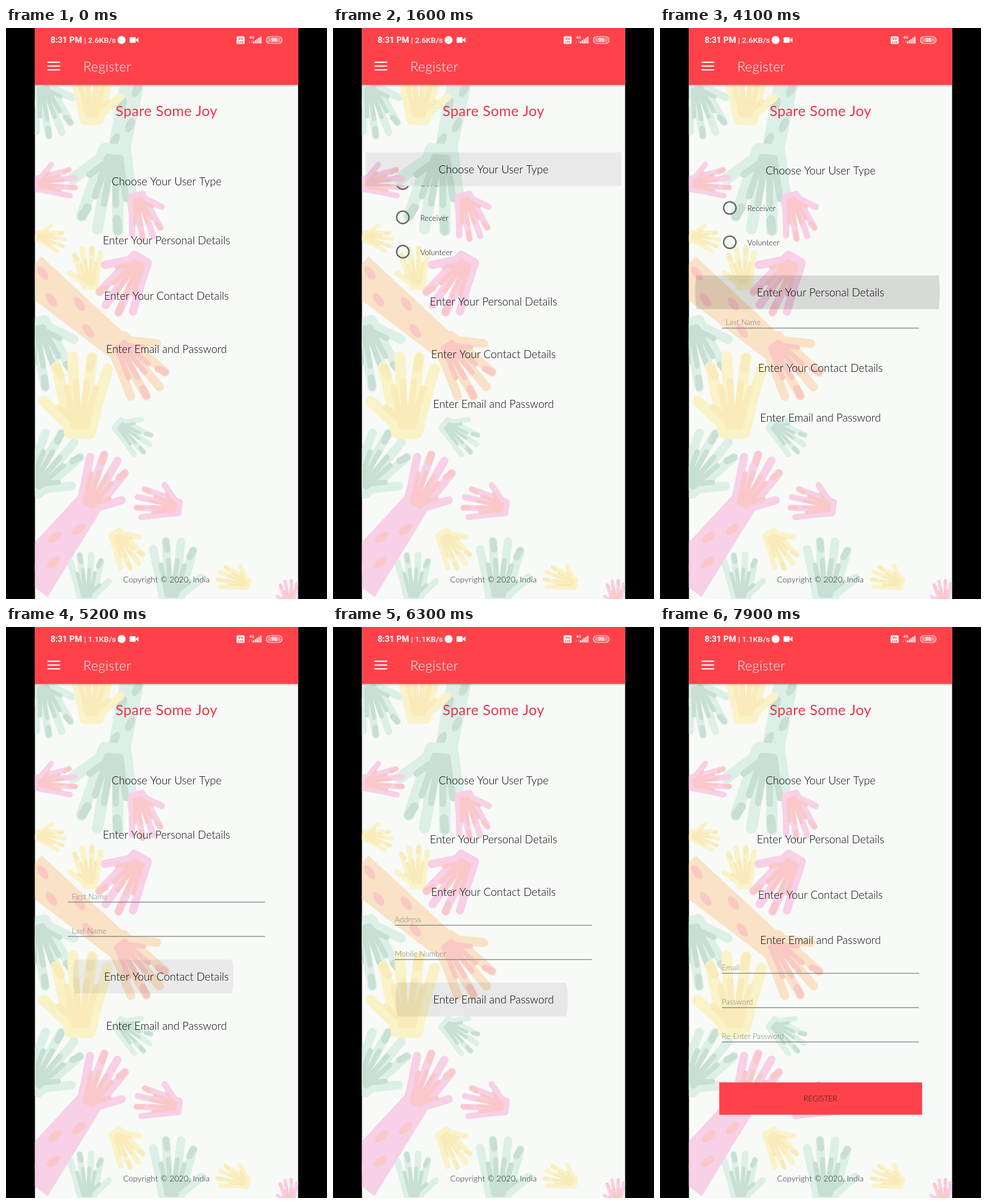
Recreate the animation shown at these times as an HTML page with a canvas. Size 561 by 998 pixels, loop 8 s.

```html
<!DOCTYPE html>
<html lang="en">
<head>
<meta charset="utf-8">
<title>Register form</title>
<style>
  html, body { margin: 0; width: 100%; height: 100%; overflow: hidden; background: #000; }
  canvas { display: block; width: 100%; height: 100%; }
</style>
</head>
<body>
<canvas id="stage" width="561" height="998"></canvas>
<script>
const W = 561, H = 998, LOOP = 8000, STEP = 100;
const LEFT = 50.6, RIGHT = 510.5, MID = 280.5, BAR = 99.5;
const RED = '#ff424a';
const ctx = document.getElementById('stage').getContext('2d');

const clamp = v => Math.max(0, Math.min(1, v));
const smooth = v => { v = clamp(v); return v * v * (3 - 2 * v); };

// ---------- backdrop of hands ----------
const art = document.createElement('canvas');
art.width = W;
art.height = H;
const g = art.getContext('2d');
g.lineCap = g.lineJoin = 'round';

const MINT = ['#dcf0e8', '#c8dfd3'], YELLOW = ['#faf3c8', '#f9ebba'],
      PINK = ['#f8d0e7', '#fac8c8'], ORANGE = ['#fae2c6', '#fac9c4'];

function line(color, width, x1, y1, x2, y2) {
  g.strokeStyle = color;
  g.lineWidth = width;
  g.beginPath();
  g.moveTo(x1, y1);
  g.lineTo(x2, y2);
  g.stroke();
}

// Size runs from the palm centre to the longest fingertip; side says where the thumb is.
function hand([color, accent], x, y, size, deg, side) {
  g.save();
  g.translate(x, y);
  g.rotate((deg + 90) * Math.PI / 180);
  g.scale(size * side, size);

  g.fillStyle = g.strokeStyle = color;
  g.lineWidth = .2;
  g.beginPath();
  for (const [px, py] of [[-.23, -.1], [.23, -.1], [.15, .27], [-.15, .27]]) g.lineTo(px, py);
  g.closePath();
  g.fill();
  g.stroke();
  line(color, .17, .18, .15, .58, -.2);

  for (let i = 0; i < 4; i++) {
    const u = i - 1.5, a = u * .33, r = .93 - .04 * u * u;
    const tx = Math.sin(a) * r, ty = -Math.cos(a) * r;
    line(color, .17, u * .16, -.1, tx, ty);
    if (accent && i % 2) line(accent, .13, tx * .82, ty * .82, tx, ty);
  }
  if (accent) hand([accent], 0, 0, .58, -90, 1);
  g.restore();
}

function arm([color, accent], x1, y1, w1, x2, y2, w2) {
  const len = Math.hypot(x2 - x1, y2 - y1);
  g.save();
  g.translate(x1, y1);
  g.rotate(Math.atan2(y2 - y1, x2 - x1));
  g.fillStyle = color;
  g.beginPath();
  for (const [x, w] of [[0, -w1], [len, -w2], [len, w2], [0, w1]]) g.lineTo(x, w / 2);
  g.fill();
  g.fillStyle = accent;
  for (let i = 0; i < 4; i++) {
    g.beginPath();
    g.ellipse(len * (.1 + i * .2), (i % 2 ? 1 : -1) * w2 * .27, 14, 7, .25, 0, 7);
    g.fill();
  }
  g.restore();
}

function paintArt() {
  g.fillStyle = '#f8faf8';
  g.fillRect(LEFT, 0, RIGHT - LEFT, H);
  g.beginPath();
  g.rect(LEFT, BAR, RIGHT - LEFT, H - BAR);
  g.clip();

  arm(MINT, 222, 90, 42, 191, 245, 38);
  hand(MINT, 187, 246, 118, 95, 1);
  hand(MINT, 68, 118, 77, 75, -1);
  hand(MINT, 60, 540, 96, 75, -1);
  hand(MINT, 207, 702, 56, 40, -1);
  hand(MINT, 60, 785, 92, -55, 1);
  hand(MINT, 141, 982, 67, -92, 1);
  hand(MINT, 290, 977, 88, -88, 1);

  hand(YELLOW, 150, 138, 85, -90, 1);
  hand(YELLOW, 65, 366, 41, 15, -1);
  hand(YELLOW, 146, 437, 57, -95, -1);
  hand(YELLOW, 130, 677, 112, -88, -1);
  hand(YELLOW, 199, 896, 56, 60, -1);
  hand(YELLOW, 411, 968, 45, 195, 1);

  arm(PINK, 40, 970, 82, 150, 825, 46);
  hand(PINK, 151, 820, 84, -65, 1);
  hand(PINK, 69, 272, 57, -2, -1);
  hand(PINK, 233, 310, 64, 75, -1);
  hand(PINK, 224, 424, 85, 120, 1);
  hand(PINK, 285, 836, 62, 187, 1);
  hand(PINK, 496, 999, 36, -95, -1);

  arm(ORANGE, 40, 425, 68, 200, 560, 48);
  hand(ORANGE, 209, 567, 92, 55, -1);
}

// ---------- drawing helpers ----------
function text(str, x, y, size, color, { align = 'left', weight = 300, family = 'Lato', gap = 0 } = {}) {
  ctx.font = `${weight} ${size}px ${family}, sans-serif`;
  ctx.letterSpacing = gap + 'px';
  ctx.textAlign = align;
  ctx.fillStyle = color;
  ctx.fillText(str, x, y + size * .355);
}

function rect(color, x, y, w, h) {
  ctx.fillStyle = color;
  ctx.fillRect(x, y, w, h);
}

function pill(x, y, w, h, r, fill) {
  ctx.beginPath();
  ctx.roundRect(x, y, w, h, r);
  fill ? ctx.fill() : ctx.stroke();
}

function statusBar(speed) {
  const bold = { family: 'Roboto', weight: 700 };
  const medium = { family: 'Roboto', weight: 500 };
  text('8:31 PM', 78, 21.3, 14.6, '#fff', bold);
  text('| ' + speed, 136.5, 21.5, 13.6, '#fff', medium);
  ctx.fillStyle = ctx.strokeStyle = '#fff';
  ctx.beginPath();
  ctx.arc(202, 21, 7, 0, 7);
  ctx.fill();
  pill(216, 16, 10.5, 10, 1.5, true);
  ctx.beginPath();
  ctx.moveTo(226, 21);
  ctx.lineTo(231.5, 16.5);
  ctx.lineTo(231.5, 25.5);
  ctx.fill();

  pill(403, 14.5, 14, 13.5, 2.5, true);
  text('Vo', 410, 18.3, 6.5, RED, { ...bold, align: 'center' });
  text('LTE', 410, 24.5, 6, RED, { ...bold, align: 'center' });
  text('4G', 425, 16.5, 7, '#fff', medium);
  text('↓↑', 423, 24, 5.5, '#ffd0d2', { family: 'DejaVu Sans', weight: 400 });
  for (let i = 0; i < 5; i++) rect('#fff', 431.5 + i * 3.2, 23.5 - i * 2.1, 2.1, 3.5 + i * 2.1);
  ctx.lineWidth = 1.2;
  pill(455, 15, 27.5, 12, 6, false);
  ctx.fillStyle = '#ff8a8f';
  pill(457, 17, 23.5, 8, 4, true);
  text('96', 468.8, 21.1, 9, '#fff', { ...bold, align: 'center' });
}

function appBar(speed) {
  ctx.save();
  ctx.shadowColor = 'rgba(0,0,0,.2)';
  ctx.shadowBlur = 3;
  ctx.shadowOffsetY = 1;
  rect(RED, LEFT, 0, RIGHT - LEFT, BAR);
  ctx.restore();
  statusBar(speed);
  for (let i = 0; i < 3; i++) rect('#fff', 72.6, 58.8 + i * 6.6, 22, 2.2);
  text('Register', 135, 67.5, 23.5, '#fff', { gap: .3 });
}

function option(label, y) {
  ctx.strokeStyle = '#666a68';
  ctx.lineWidth = 2.5;
  ctx.beginPath();
  ctx.arc(122, y, 10.8, 0, 7);
  ctx.stroke();
  text(label, 152.5, y + .8, 13.5, '#111');
}

function field(label, y, x = 108) {
  text(label, x, y, 13.3, '#7d817f');
  rect('#747876', 108, y + 9.2, 344.5, 1.2);
}

// ---------- accordion ----------
const OPEN_MS = 300, CLOSE_MS = 270, ROW = 60, HALF = 29.5;

const stack = (labels, row, first, x) => labels.forEach((label, i) => row(label, first + i * ROW, x));

// y: closed position, lift: own rise when open, push: drop of the next header, at: opening time.
// Contents hang from the bottom edge of their section and slide out below its header.
const SECTIONS = [
  { title: 'Choose Your User Type', y: 268, lift: 27, push: 137, at: 1390,
    body: end => stack(['Donor', 'Receiver', 'Volunteer'], option, end - 207.5) },
  { title: 'Enter Your Personal Details', y: 371, lift: 8, push: 143, at: 3998,
    body: end => stack(['First Name', 'Last Name'], field, end - 140, 115) },
  { title: 'Enter Your Contact Details', y: 468, lift: 5, push: 90, at: 5230,
    body: end => stack(['Address', 'Mobile Number'], field, end - 139.5) },
  { title: 'Enter Email and Password', y: 561, lift: 14, push: 0, at: 6320,
    body: end => {
      stack(['Email', 'Password', 'Re-Enter Password'], field, end - 257.5);
      rect(RED, 103.5, end - 57, 354.5, 56.5);
      text('REGISTER', MID, end - 28.5, 13.2, '#3a1013', { align: 'center' });
    } }
];

function openness(i, t) {
  const next = SECTIONS[i + 1];
  return smooth((t - SECTIONS[i].at) / OPEN_MS) - (next ? smooth((t - next.at) / CLOSE_MS) : 0);
}

// Headers further down are pushed a little less, as the gaps between them shrink.
function shift(i, j) {
  if (j < i) return 0;
  return j === i ? -SECTIONS[i].lift : SECTIONS[i].push - 7 * (j - i - 1);
}

function ripple(y, age) {
  if (age <= 0 || age >= 390) return;
  const alpha = .13 * clamp(age / 170) * clamp((390 - age) / 140);
  ctx.save();
  ctx.beginPath();
  ctx.rect(57, y - HALF, 447, HALF * 2);
  ctx.clip();
  ctx.fillStyle = `rgba(0,0,0,${alpha})`;
  ctx.beginPath();
  ctx.arc(MID - 56 * Math.exp(-age / 90), y, 235 * (1 - Math.exp(-age / 88)), 0, 7);
  ctx.fill();
  ctx.restore();
}

function accordion(t) {
  const open = SECTIONS.map((_, i) => openness(i, t));
  const ys = SECTIONS.map((s, j) => open.reduce((sum, p, i) => sum + p * shift(i, j), s.y));
  SECTIONS.forEach(({ title, body, at }, i) => {
    const y = ys[i];
    if (open[i] > 0) {
      ctx.save();
      ctx.beginPath();
      ctx.rect(LEFT, y + HALF, RIGHT - LEFT, H);
      ctx.clip();
      body(ys[i + 1] ?? y + 16 + 290 * open[i]);
      ctx.restore();
    }
    ripple(y, t - at + 110);
    text(title, MID, y, 19, '#000', { align: 'center' });
  });
}

function draw(t) {
  rect('#000', 0, 0, W, H);
  ctx.drawImage(art, 0, 0);
  appBar(t < 4500 ? '2.6KB/s' : '1.1KB/s');
  text('Spare Some Joy', MID, 145.5, 25, '#ee3549', { align: 'center', gap: .4, weight: 400 });
  accordion(t);
  text('Copyright © 2020, India', MID, 964.5, 14, '#222', { align: 'center', gap: .2 });
}

paintArt();
const start = performance.now();
function tick() {
  const t = (performance.now() - start) % LOOP;
  draw(Math.floor(t / STEP) * STEP);
  requestAnimationFrame(tick);
}
tick();
</script>
</body>
</html>
```
